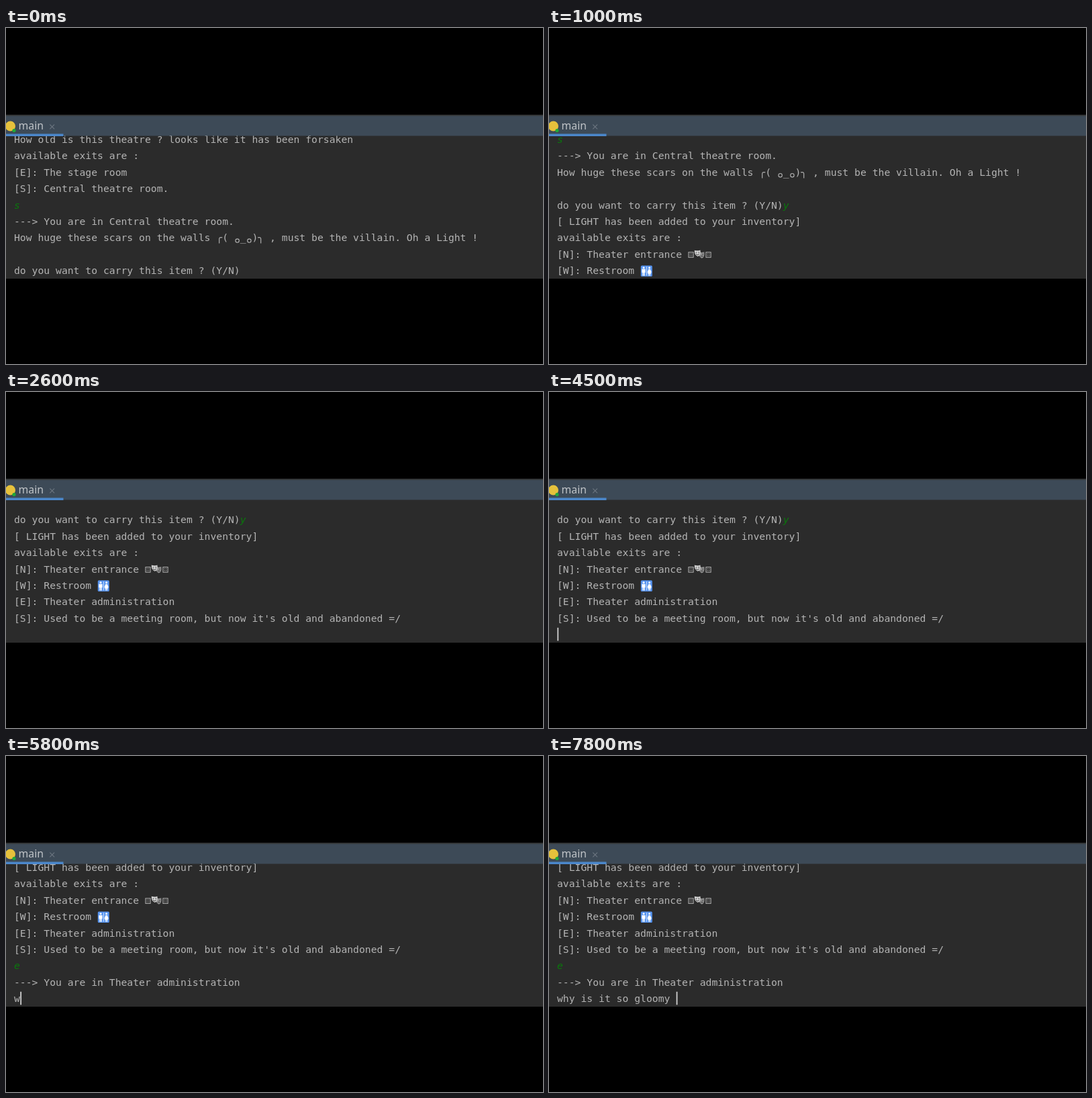
These frames come from a looping animation (800x500 px, 8 s). An HTML page:

```html
<!DOCTYPE html>
<html lang="en">
<head>
<meta charset="utf-8">
<title>Theatre text adventure</title>
<style>
  html, body { margin: 0; width: 100%; height: 100%; overflow: hidden; background: #000; }
  svg { display: block; width: 800px; height: 500px; }
  .line { font: 14.72px "DejaVu Sans Mono", monospace; fill: #b4b4b4; }
  .typed { font-style: italic; fill: #0a780c; }
  .tab { font: 15.8px "Noto Sans", sans-serif; fill: #c0c4c8; }
</style>
</head>
<body>
<svg viewBox="0 0 800 500">
  <defs>
    <g id="eyes" fill="none" stroke="#b4b4b4" stroke-width="1.1">
      <circle cx="332.6" cy="-.7" r="2.7"/>
      <circle cx="350.4" cy="-.7" r="2.7"/>
    </g>
    <g id="tofu" fill="none" stroke="#b4b4b4">
      <rect x=".9" y="-8" width="7.2" height="7.6"/>
      <path d="M2.6-5.6H4M5-5.6H6.4M2.6-2.8H4M5-2.8H6.4"/>
    </g>
    <g id="masks">
      <use href="#tofu" x="195"/>
      <path d="M211-8.5Q215-7 219.3-8.5Q220.5 0 215.5 1Q210.5-1 211-8.5Z" fill="#8d8d8d"/>
      <path d="M204.8-11Q209-9.6 213.4-11.2Q215-3.5 209.6-1.8Q204.3-4 204.8-11Z" fill="#d2d2d2"/>
      <path d="M206.6-7.6h1.7M210.4-7.7h1.7M207-5.2Q209.5-2.6 211.8-5.4M216.3-5h1.5M213.8-1.6Q215.5-3.4 217.6-1.8" fill="none" stroke="#333"/>
      <use href="#tofu" x="221"/>
    </g>
    <g id="restroom">
      <rect x="124.8" y="-12.6" width="17" height="16.4" rx="1.5" fill="#5794ef"/>
      <g fill="#fff">
        <circle cx="129" cy="-9.4" r="1.5"/>
        <path d="M126.4-7.3H131.6V-2H130.7V2.6H129.3V-1.8H128.7V2.6H127.3V-2H126.4Z"/>
        <circle cx="137.6" cy="-9.4" r="1.5"/>
        <path d="M136.4-7.3H138.8L140.8-2.2L139.6-2L140.2-.4H139V2.6H137.9V-.4H137.3V2.6H136.2V-.4H135L135.6-2L134.4-2.2Z"/>
        <rect x="133" y="-11" width=".7" height="13.4"/>
      </g>
    </g>
  </defs>

  <rect y="160" width="800" height="213" fill="#2b2b2b"/>
  <g id="console"></g>
  <rect id="caret" width="1.8" height="19.5" fill="#d0d0d0"/>

  <rect y="373" width="800" height="127"/>
  <rect width="800" height="129"/>
  <rect y="129" width="800" height="2.5" fill="#343739"/>
  <rect y="131" width="800" height="29.5" fill="#3d4a57"/>
  <rect y="157.5" width="85.5" height="3.5" fill="#4b87cb"/>
  <circle cx="6.5" cy="146" r="7.5" fill="#e6c13c"/>
  <circle cx="12" cy="152.6" r="2.6" fill="#1fa83a"/>
  <text class="tab" x="18.5" y="151.3">main</text>
  <path d="M65.3 143.6l6.8 6.8m0-6.8l-6.8 6.8" stroke="#6c7680" stroke-width="1.1"/>
</svg>

<script>
const LOOP = 8000, LEFT = 12, BASE = 171.1, PITCH = 24.37, CHAR = 8.862;
const ROWS = 9;

// Each line: printed text, typed reply, inline picture
const transcript = [
  ["How old is this theatre ? looks like it has been forsaken"],
  ["available exits are :"],
  ["[E]: The stage room"],
  ["[S]: Central theatre room."],
  ["", "s"],
  ["---> You are in Central theatre room."],
  ["How huge these scars on the walls ╭(  _ )╮ , must be the villain. Oh a Light !", "", "eyes"],
  [""],
  ["do you want to carry this item ? (Y/N)", "y"],
  ["[ LIGHT has been added to your inventory]"],
  ["available exits are :"],
  ["[N]: Theater entrance", "", "masks"],
  ["[W]: Restroom", "", "restroom"],
  ["[E]: Theater administration"],
  ["[S]: Used to be a meeting room, but now it's old and abandoned =/"],
  ["", "e"],
  ["---> You are in Theater administration"],
  [""]
];
const gloomy = "why is it so gloomy ";

// [time, value] steps
const scrollSteps = [[0, 0], [1000, 4], [1100, 7], [5800, 9]];
const caretSteps = [[0, 0], [1100, 1], [1800, 0], [2200, 1], [2600, 0],
  [3500, 1], [4000, 0], [4500, 1], [5000, 0], [5400, 1]];
const typingSteps = [[0, 0], [5800, 1], [6100, 3], [6300, 6], [6700, 8],
  [6900, 10], [7100, 13], [7400, 15], [7600, 17], [7800, 20]];
const REPLY_Y = 800, REPLY_E = 5500;

const consoleGroup = document.getElementById("console");
const caret = document.getElementById("caret");

function add(parent, tag, attributes = {}) {
  const node = document.createElementNS("http://www.w3.org/2000/svg", tag);
  for (const key in attributes) node.setAttribute(key, attributes[key]);
  return parent.appendChild(node);
}

const keepSpaces = text => text.replace(/ /g, "\u00a0");

const lines = transcript.map(([text, reply = "", picture], i) => {
  const group = add(consoleGroup, "g", { transform: `translate(${LEFT} ${BASE + i * PITCH})` });
  const label = add(group, "text", { class: "line" });
  const printed = add(label, "tspan");
  const typed = add(label, "tspan", { class: "typed" });
  printed.textContent = keepSpaces(text);
  typed.textContent = reply;
  if (picture) add(group, "use", { href: "#" + picture });
  return { printed, typed };
});

const valueAt = (steps, t) => steps.findLast(([start]) => start <= t)[1];
const show = (node, visible) => node.setAttribute("visibility", visible ? "visible" : "hidden");

function draw(t) {
  const count = valueAt(typingSteps, t);
  const column = count || (t >= REPLY_E ? 1 : 0);
  consoleGroup.setAttribute("transform", `translate(0 ${-valueAt(scrollSteps, t) * PITCH})`);
  show(lines[8].typed, t >= REPLY_Y);
  show(lines[15].typed, t >= REPLY_E);
  lines[17].printed.textContent = keepSpaces(gloomy.slice(0, count));
  caret.setAttribute("x", LEFT + .4 + column * CHAR);
  caret.setAttribute("y", BASE + (ROWS - 1) * PITCH - 15.3);
  show(caret, valueAt(caretSteps, t));
}

const start = performance.now();
function tick() {
  draw((performance.now() - start) % LOOP);
  requestAnimationFrame(tick);
}
tick();
</script>
</body>
</html>
```
